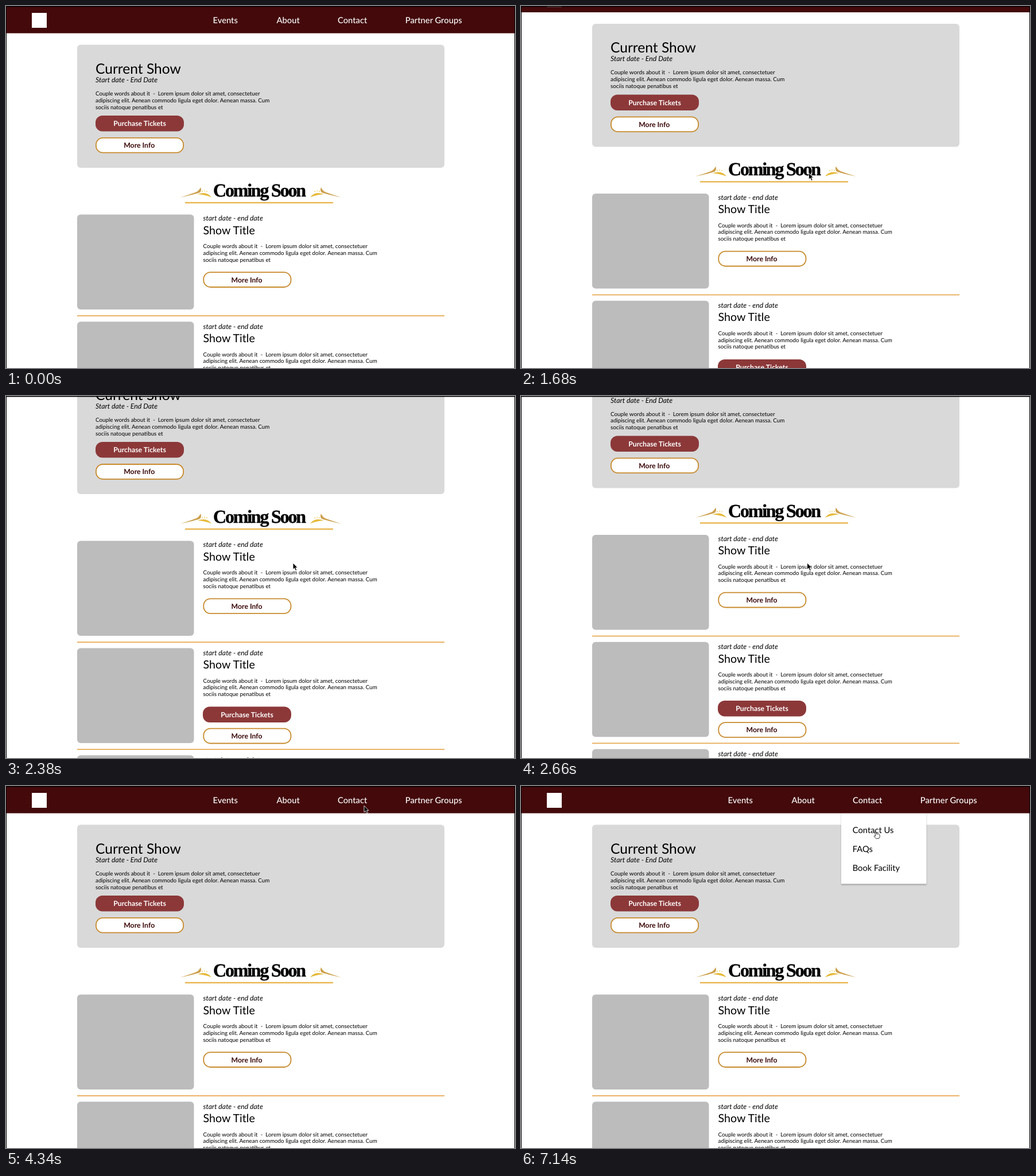
An HTML page for the animation above (8000 ms loop, 887x631 px).

```html
<!DOCTYPE html>
<html lang="en">
<head>
<meta charset="utf-8">
<title>Show listing page</title>
<style>
html, body { margin: 0; width: 100%; height: 100%; overflow: hidden; background: #fff; }
svg { display: block; width: 887px; height: 631px; }
text { font-family: Lato, sans-serif; white-space: pre; text-rendering: geometricPrecision; }
.nav { font-size: 14.75px; }
.top { font-weight: 500; }
.h1 { font-size: 24.58px; }
.h2 { font-size: 19.67px; }
.date { font-size: 12.29px; font-style: italic; }
.copy { font-size: 9.83px; }
.btn { font-size: 12.29px; font-weight: bold; text-anchor: middle; }
.soon { font: bold 32px "Liberation Serif", serif; letter-spacing: -2.2px; stroke: #000; stroke-width: .4; }
#menu rect { filter: drop-shadow(0 2.5px 1.3px rgba(0, 0, 0, .25)); }
</style>
</head>
<body>
<svg viewBox="0 0 887 631">
  <defs>
    <g id="flourish">
      <path d="M304 333.5Q322 328 332 324Q337 321 339 316Q341.5 321 338 325Q330 328 304 333.5Z" fill="#cda04e"/>
      <path d="M334 328Q350 322 358 333.5Q348 329 334 328Z" fill="#e6b93a"/>
      <g fill="#efc84c"><circle cx="342" cy="323" r=".9"/><circle cx="346" cy="322.3" r=".9"/><circle cx="350" cy="323.3" r=".9"/></g>
    </g>
  </defs>
  <g id="page"></g>
  <circle id="tap" cx="672" cy="415" r="17" opacity=".12"/>
  <path d="M0 0H887V631H886V1.5H1V631H0Z"/>
  <g id="pointer">
    <path id="arrow" d="M0 0V11.3L2.6 8.9L4.6 13.4L6.6 12.5L4.7 8.2H8Z" stroke="#fff" stroke-width=".8"/>
    <path id="hand" d="M2.3 1.2q1.2-.8 1.8.4l1.4 3.4 3.6-.6q1.5.2 1.9 2l.4 2.8-1.4 3-4.9.6-3.6-3.5q-.9-1.5.8-1.5l1.6.6z" fill="#fff" stroke="#222" stroke-width=".9"/>
  </g>
</svg>
<script>
const $ = id => document.getElementById(id);
const label = (cls, x, y, s, fill = '#000') =>
  `<text class="${cls}" x="${x}" y="${y}" fill="${fill}">${s}</text>`;
const box = (x, y, w, h, r, attrs) =>
  `<rect x="${x}" y="${y}" width="${w}" height="${h}" rx="${r}" ${attrs}/>`;

const blurb = ['Couple words about it  -  Lorem ipsum dolor sit amet, consectetuer',
  'adipiscing elit. Aenean commodo ligula eget dolor. Aenean massa. Cum',
  'sociis natoque penatibus et'];
const copy = (x, y) => blurb.map((s, i) => label('copy', x, y + i * 11.75, s)).join('');

const buy = (x, y) => box(x, y, 154, 27.5, 12, 'fill="#8c3839"') +
  label('btn', x + 77, y + 18.3, 'Purchase Tickets', '#fff');
const info = (x, y) =>
  box(x + .9, y + .9, 152.2, 25.8, 12, 'fill="#fff" stroke="#c78a2c" stroke-width="1.8"') +
  label('btn', x + 76.2, y + 18.2, 'More Info', '#3b0808');

function show(row) {
  const tickets = row > 0, y = 363.5 + row * 186.8;
  const textY = y + (tickets ? 12.4 : 10.8);
  return box(124, y, 203.5, 165.5, 6, 'fill="#bcbcbc"') +
    label('date', 343.5, textY, 'start date - end date') +
    label('h2', 343.5, textY + 23.3, 'Show Title') +
    copy(343.5, textY + 47.8) +
    (tickets ? buy(343, textY + 89.8) : '') +
    info(343.4, textY + (tickets ? 127 : 89)) +
    box(124, y + 175.6, 640, 1.8, 0, 'fill="#e8ac58"');
}

$('page').innerHTML =
  box(124, 67.5, 640, 214.5, 6, 'fill="#d9d9d9"') +
  label('h1', 156, 118, 'Current Show') +
  label('date', 156, 133, 'Start date - End Date') +
  copy(156, 156) + buy(156, 191) + info(156, 229) +
  '<use href="#flourish"/><use href="#flourish" transform="matrix(-1 0 0 1 888 0)"/>' +
  label('soon', 361, 332, 'Coming Soon') +
  box(312, 341.7, 258, 2.4, 0, 'fill="#e9b650"') +
  [0, 1, 2].map(show).join('') +
  '<g id="menu">' + box(558, 40, 148.5, 130.5, 0, 'fill="#fff"') +
  ['Contact Us', 'FAQs', 'Book Facility'].map((s, i) => label('nav', 577.7, 82.2 + i * 32.7, s)).join('') +
  '</g>' +
  box(0, 0, 887, 47.5, 0, 'fill="#43090b"') +
  box(45, 12, 26, 26, 0, 'fill="#fff"') +
  label('nav top', 360.5, 30.3, 'Events', '#fff') + label('nav top', 471.5, 30.3, 'About', '#fff') +
  label('nav top', 578, 30.3, 'Contact', '#fff') + label('nav top', 695.8, 30.3, 'Partner Groups', '#fff');

const progress = (t, from, to) => Math.min(1, Math.max(0, (t - from) / (to - from)));
const smooth = u => u * u * (3 - 2 * u);

// Pointer strokes: start, end, destination
const strokes = [
  [70, 350, 672, 415], [700, 1050, 447, 329], [1120, 1680, 501.5, 291], [2100, 2660, 498.7, 291],
  [3220, 3500, 606, 126], [3780, 4060, 684, 60], [4060, 4410, 609, 28], [4480, 4620, 611, 27.5],
  [6440, 6720, 624, 91.5], [6790, 7140, 614, 79]];
const pointerAt = t => strokes.reduce(([x, y], [from, to, tx, ty]) => {
  const u = progress(t, from, to);
  return [x + (tx - x) * u, y + (ty - y) * u];
}, [640, 563]);

const scrollAt = t => 121.5 * (smooth(progress(t, 1120, 2660)) - smooth(progress(t, 2660, 2940)));

const visible = (id, on) => $(id).style.display = on ? '' : 'none';
const start = performance.now();

function draw() {
  const elapsed = Math.max(0, performance.now() - start) % 8000;
  const t = Math.floor(elapsed / 70) * 70;
  $('page').setAttribute('transform', `translate(0 ${-scrollAt(t)})`);
  $('pointer').setAttribute('transform', `translate(${pointerAt(t)})`);
  const fade = progress(t, 4900, 5390);
  $('menu').setAttribute('opacity', 1 - (1 - fade) ** 2);
  visible('menu', fade > 0);
  visible('pointer', t >= 70);
  visible('tap', t === 560);
  visible('arrow', t < 6650);
  visible('hand', t >= 6650);
  requestAnimationFrame(draw);
}
draw();
</script>
</body>
</html>
```
